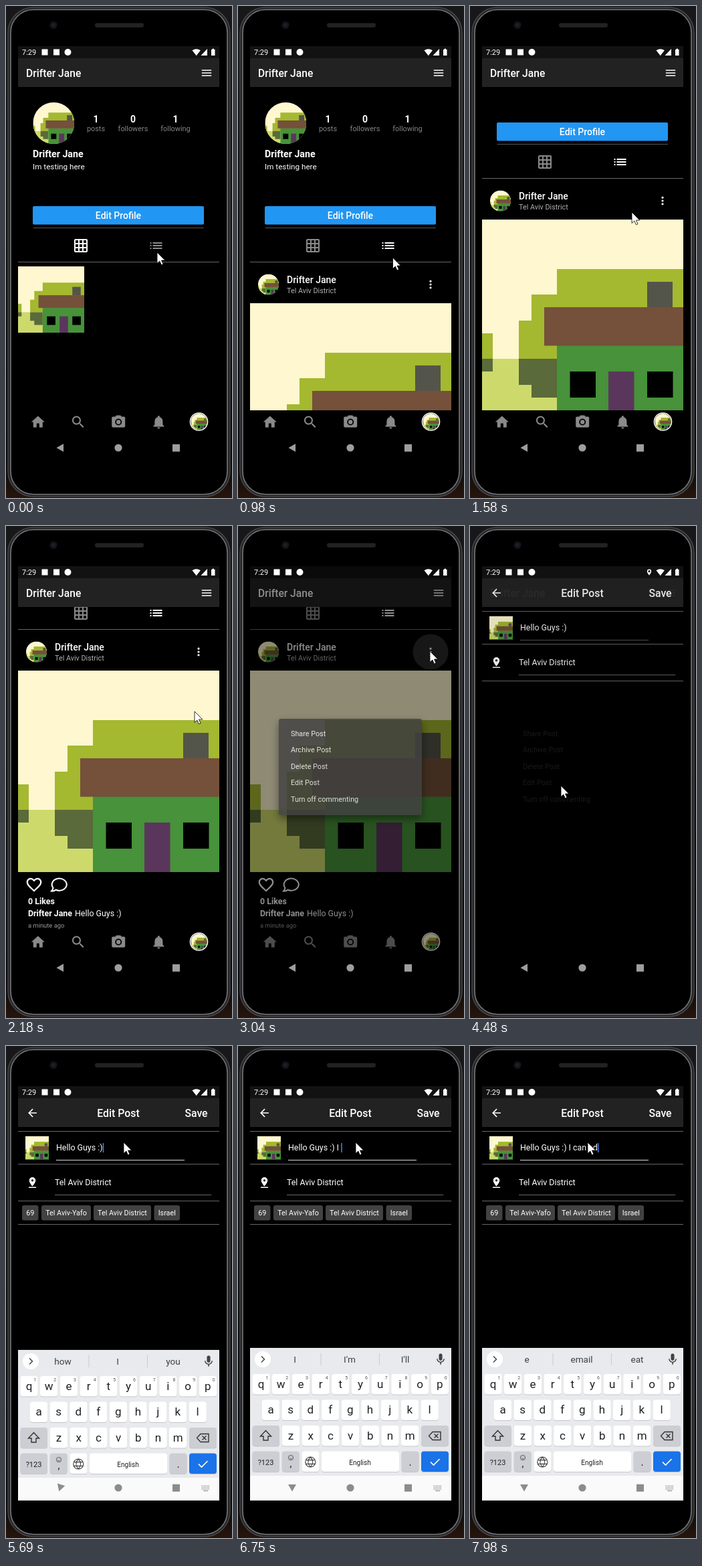
These frames come from a looping animation (338 by 735 pixels, 8 s). An HTML page:

```html
<!DOCTYPE html>
<html lang="en">
<head>
<meta charset="utf-8">
<title>Profile post editing</title>
<style>
  html, body { margin: 0; width: 100%; height: 100%; overflow: hidden; background: #070708; }
  svg { display: block; width: 338px; height: 735px; }
  text { font-family: Roboto, Arial, sans-serif; white-space: pre; }
</style>
</head>
<body>
<svg id="stage" viewBox="0 0 338 735"></svg>
<script>
const LOOP = 8000;
const USER = 'Drifter Jane';
const GREY = '#8a8a8a', LINE = '#666';

// Icons on a 24-unit square
const ICONS = {
  grid: 'M20 2H4c-1.1 0-2 .9-2 2v16c0 1.1.9 2 2 2h16c1.1 0 2-.9 2-2V4c0-1.1-.9-2-2-2zM8 20H4v-4h4v4zm0-6H4v-4h4v4zm0-6H4V4h4v4zm6 12h-4v-4h4v4zm0-6h-4v-4h4v4zm0-6h-4V4h4v4zm6 12h-4v-4h4v4zm0-6h-4v-4h4v4zm0-6h-4V4h4v4z',
  list: 'M3 13h2v-2H3zm0 4h2v-2H3zm0-8h2V7H3zm4 4h14v-2H7zm0 4h14v-2H7zM7 7v2h14V7z',
  menu: 'M3 18h18v-2H3zm0-5h18v-2H3zm0-7v2h18V6z',
  home: 'M10 20v-6h4v6h5v-8h3L12 3 2 12h3v8z',
  search: 'M15.5 14h-.8l-.3-.3A6.5 6.5 0 1 0 13.7 14.4l.3.3v.8l5 5 1.5-1.5zm-6 0a4.5 4.5 0 1 1 0-9 4.5 4.5 0 0 1 0 9z',
  camera: 'M12 8.8a3.2 3.2 0 1 0 0 6.4 3.2 3.2 0 0 0 0-6.4zM9 2 7.2 4H4c-1.1 0-2 .9-2 2v12c0 1.1.9 2 2 2h16c1.1 0 2-.9 2-2V6c0-1.1-.9-2-2-2h-3.2L15 2zm3 15a5 5 0 1 1 0-10 5 5 0 0 1 0 10z',
  bell: 'M12 22c1.1 0 2-.9 2-2h-4c0 1.1.9 2 2 2zm6-6v-5c0-3.1-1.6-5.6-4.5-6.3V4a1.5 1.5 0 0 0-3 0v.7C7.6 5.4 6 7.9 6 11v5l-2 2v1h16v-1z',
  dots: 'M12 8a2 2 0 1 0 0-4 2 2 0 0 0 0 4zm0 2a2 2 0 1 0 0 4 2 2 0 0 0 0-4zm0 6a2 2 0 1 0 0 4 2 2 0 0 0 0-4z',
  heart: 'M16.5 3c-1.7 0-3.4.8-4.5 2.1C10.9 3.8 9.2 3 7.5 3 4.4 3 2 5.4 2 8.5c0 3.8 3.4 6.9 8.6 11.5l1.4 1.3 1.4-1.3C18.6 15.4 22 12.3 22 8.5 22 5.4 19.6 3 16.5 3zm-4.4 15.6-.1.1-.1-.1C7.1 14.2 4 11.4 4 8.5 4 6.5 5.5 5 7.5 5c1.5 0 3 1 3.6 2.4h1.9C13.5 6 15 5 16.5 5c2 0 3.5 1.5 3.5 3.5 0 2.9-3.1 5.7-7.9 10.1z',
  back: 'M20 11H7.8l5.6-5.6L12 4l-8 8 8 8 1.4-1.4L7.8 13H20z',
  pin: 'M18 8A6 6 0 0 0 6 8c0 4.5 6 11 6 11s6-6.5 6-11zm-8 0a2 2 0 1 1 4 0 2 2 0 0 1-4 0zM5 20v2h14v-2z',
  place: 'M12 2a7 7 0 0 0-7 7c0 5.3 7 13 7 13s7-7.7 7-13a7 7 0 0 0-7-7zm0 3.5a3.5 3.5 0 1 1 0 7 3.5 3.5 0 0 1 0-7z',
  mic: 'M12 14a3 3 0 0 0 3-3V5a3 3 0 0 0-6 0v6a3 3 0 0 0 3 3zm5.3-3a5.3 5.3 0 0 1-10.6 0H5c0 3.4 2.7 6.2 6 6.7V21h2v-3.3c3.3-.5 6-3.3 6-6.7z'
};

const rect = (x, y, w, h, fill, r = 0, more = '') =>
  `<rect x="${x}" y="${y}" width="${w}" height="${h}" rx="${r}" fill="${fill}" ${more}/>`;
const disc = (x, y, r, fill) => `<circle cx="${x}" cy="${y}" r="${r}" fill="${fill}"/>`;
const path = (d, fill, more = '') => `<path d="${d}" fill="${fill}" ${more}/>`;
const stroke = (d, color, w = 1.5) => path(d, 'none', `stroke="${color}" stroke-width="${w}"`);
const text = (x, y, size, str, fill = '#fff', weight = 400, more = '') =>
  `<text x="${x}" y="${y}" font-size="${size}" font-weight="${weight}" fill="${fill}" ${more}>${str}</text>`;
const mid = (x, y, size, str, fill, weight, more = '') =>
  text(x, y, size, str, fill, weight, `text-anchor="middle" ${more}`);
const icon = (name, x, y, scale = 1, fill = '#fff', more = '') =>
  path(ICONS[name], fill, `fill-rule="evenodd" transform="translate(${x} ${y}) scale(${scale}) translate(-12 -12)" ${more}`);
const group = (id, body, more = '') => `<g id="${id}" ${more}>${body}</g>`;
const rule = (y, x = 18, w = 301, color = LINE, more = '') => rect(x, y, w, 1, color, 0, more);
const house = (x, y, size) => `<use href="#house" x="${x}" y="${y}" width="${size}" height="${size}"/>`;
const avatar = (x, y, r) => `<svg x="${x - r}" y="${y - r}" width="${2 * r}" height="${2 * r}" viewBox="0 0 301 301">
  <g clip-path="url(#round)">${house(0, 0, 301)}</g></svg>`;

const defs = `<defs>
  <symbol id="house" viewBox="0 0 301 301">
    ${rect(0, 0, 301, 301, '#fef7d0')}${rect(0, 208, 112, 93, '#cdda6b')}
    ${rect(0, 170, 16, 38, '#a4b830')}${rect(0, 208, 16, 19, '#5a6a3a')}
    ${path('M112 74H301V208H55V151H74V112H112z', '#a4b830')}
    ${path('M55 208H112V266H74V247H55z', '#5a6a3a')}
    ${rect(112, 188, 189, 113, '#47923a')}${rect(93, 131, 208, 57.5, '#75503a')}
    ${rect(247, 93, 38, 38, '#54554a')}
    ${rect(131.5, 227, 38.5, 39, '#000')}${rect(247, 227, 38.5, 39, '#000')}
    ${rect(189, 227, 38.5, 74, '#5b365c')}
  </symbol>
  <clipPath id="round"><circle cx="150.5" cy="150.5" r="150.5"/></clipPath>
  <clipPath id="screen"><rect x="18" y="60" width="301" height="619"/></clipPath>
  <clipPath id="view"><rect x="18" y="121" width="301" height="483"/></clipPath>
  <linearGradient id="desk" x2="0" y2="1">
    <stop offset="0" stop-color="#18181a"/><stop offset=".93" stop-color="#0a0a0a"/><stop offset="1" stop-color="#27150d"/>
  </linearGradient>
  <filter id="shade" x="-20%" y="-20%" width="140%" height="150%">
    <feDropShadow dx="0" dy="5" stdDeviation="6" flood-opacity=".5"/>
  </filter>
</defs>`;

const phone = rect(0, 0, 338, 735, 'url(#desk)')
  + rect(3, 2, 332, 731, '#262628', 38, 'stroke="#454548" stroke-width="1.5"')
  + rect(7, 5.5, 324, 724, '#000', 34, 'stroke="#77777b" stroke-width="1.6"')
  + rect(133, 25.5, 73, 6.5, '#222224', 3.2) + disc(71, 28.5, 5.5, '#141519') + disc(71, 28.5, 2.5, '#1e202a');

const bars = rect(18, 60, 301, 18, '#121212') + rect(18, 78, 301, 43, '#222');

const stats = [['1', 'posts', 134.5], ['0', 'followers', 190], ['1', 'following', 253.5]]
  .map(([n, label, x]) => mid(x, 174, 14, n, '#fff', 700) + mid(x, 187, 10.9, label, '#858585')).join('');

// Post laid out at its final scrolled place
const post = avatar(45.5, 188, 15.5)
  + text(73, 185.5, 14, USER, '#fff', 500) + text(73, 200.5, 10.8, 'Tel Aviv District', '#b0b0b0')
  + group('splash', disc(288, 188, 26.5, '#2a2a2a'))
  + icon('dots', 288, 188, .8) + house(18, 216, 301)
  + icon('heart', 42, 536, 1.13)
  + stroke('M70.5 540.5A11 9 0 1 1 74.5 543.5Q72 546 68 545.5Q70 543.5 70.5 540.5z', '#fff', 2)
  + text(33, 565, 12.4, '0 Likes', '#fff', 700) + text(33, 583, 12.4, USER, '#fff', 700)
  + text(103, 583, 12.4, 'Hello Guys :)') + text(33, 600, 9.4, 'a minute ago', '#9a9a9a');

const profile = rect(18, 60, 301, 619, '#000')
  + `<g clip-path="url(#view)">` + group('scroll',
    avatar(71.3, 175, 31) + stats
    + text(40, 226, 14.2, USER, '#fff', 700) + text(40, 244, 11.7, 'Im testing here')
    + rect(40, 299, 256, 27.5, '#2196f3', 2) + mid(168, 318, 14, 'Edit Profile', '#fff', 500)
    + rule(331, 40.5, 255.5, '#555') + rule(382)
    + group('tabSplash', disc(224.5, 358, 26, '#fff'))
    + icon('grid', 112, 358, 1, '#fff', 'id="gridTab"') + icon('list', 224.5, 358, 1, GREY, 'id="listTab"')
    + group('thumbs', house(18, 389, 99)) + group('feed', post, 'transform="translate(0 228)"'))
  + '</g>' + bars + text(30, 105.5, 15.6, USER, '#fff', 500) + icon('menu', 300, 100, .8)
  + ['home', 'search', 'camera', 'bell'].map((n, i) => icon(n, 47.8 + 60.2 * i, 621.5, 1, GREY)).join('')
  + disc(288.5, 621, 13.8, '#fff') + disc(288.5, 621, 12.3, '#000') + avatar(288.5, 621, 12);

const scrim = rect(18, 60, 301, 582, '#000', 0, 'id="scrim"') + rect(18, 121, 301, 521, '#000', 0, 'id="cover"');
const dialog = rect(61, 288, 214, 144, '#424242', 3, 'id="box" filter="url(#shade)"')
  + rect(61, 371, 214, 24.5, '#fff', 0, 'id="press" opacity="0"')
  + ['Share Post', 'Archive Post', 'Delete Post', 'Edit Post', 'Turn off commenting']
    .map((s, i) => text(79, 313.5 + 24.6 * i, 10.8, s)).join('');

const chips = [[24, 24.5, '69'], [53, 74, 'Tel Aviv-Yafo'], [131, 86, 'Tel Aviv District'], [221.5, 38.5, 'Israel']]
  .map(([x, w, s]) => rect(x, 238, w, 22.5, '#424242', 3) + mid(x + w / 2, 253, 10.8, s, '#fff')).join('') + rule(266);

const edit = rect(18, 60, 301, 582, '#000') + bars
  + icon('back', 39.5, 100, .8) + mid(168, 105.5, 15.8, 'Edit Post', '#fff', 500) + mid(284.5, 105.5, 15.8, 'Save', '#fff', 500)
  + rule(127) + rule(176) + rule(231) + house(29, 134.5, 35)
  + text(75, 156, 12.4, 'Hello Guys :)', '#fff', 400, 'id="typed"')
  + rule(170, 75, 192, '#555', 'id="focusLine"') + rect(144, 145, 1.5, 14, '#4285f4', 0, 'id="caret"')
  + icon('pin', 39.5, 204, .8) + text(73, 208, 12.4, 'Tel Aviv District') + rule(222, 73, 234)
  + group('chips', chips);

const INK = '#202124', SOFT = '#ccced3';
const key = (x, y, w, fill = '#fff') => rect(x, y + 1, w, 30.5, '#c4c6ca', 4) + rect(x, y, w, 30.5, fill, 4);
const keyRow = (letters, x, y) => [...letters].map((c, i) => {
  const cx = x + 29.7 * i;
  return key(cx - 13.2, y, 26.4) + mid(cx, y + 20.5, 17, c, INK);
}).join('');

const keyboard = rect(18, 451, 301, 191, '#e8eaed') + rect(18, 642, 301, 60, '#fafafa')
  + disc(37, 468, 12, '#fff') + stroke('M35 463.5l4.5 4.5-4.5 4.5', '#444')
  + rect(123.5, 459, 1, 18, '#cacccf') + rect(211, 459, 1, 18, '#cacccf') + icon('mic', 303, 468, .85, '#444')
  + [85, 167, 250].map((x, i) => mid(x, 473, 13.6, '', '#3c4043', 400, `id="hint${i}"`)).join('')
  + keyRow('qwertyuiop', 34.5, 490)
  + [...'1234567890'].map((n, i) => mid(43.5 + 29.7 * i, 498, 7, n, '#555')).join('')
  + keyRow('asdfghjkl', 49, 528.5) + keyRow('zxcvbnm', 79, 567)
  + key(21.5, 567, 40.5, SOFT) + stroke('M41.5 574.5l8 8.5h-4.5v6h-7v-6h-4.5z', '#333', 1.4)
  + key(274, 567, 41, SOFT) + stroke('M291 576.5h12v12h-12l-5.5-6zM293.5 579.5l6 6m0-6l-6 6', '#333', 1.4)
  + key(21.5, 605.5, 40.5, SOFT) + mid(41.5, 625.5, 11, '?123', INK)
  + key(65.8, 605.5, 26, SOFT) + mid(79, 629, 15, ',', INK)
  + stroke('M75.3 615a3.7 3.7 0 1 0 7.4 0a3.7 3.7 0 1 0-7.4 0M77 616q2 2 4 0M77.5 613.7v.6m3-.6v.6', '#555', .9)
  + key(95.5, 605.5, 26)
  + stroke('M100.8 621.5a7.5 7.5 0 1 0 15 0a7.5 7.5 0 1 0-15 0M108.3 614q-7 7.5 0 15q7-7.5 0-15M102 618.7h12.6M102 624.3h12.6', '#444', 1.2)
  + key(125, 605.5, 116) + mid(182.5, 625.5, 10, 'English', INK)
  + key(244.5, 605.5, 26, SOFT) + mid(257.5, 627, 16, '.', INK)
  + key(274, 605.5, 41, '#1a73e8') + stroke('M288 621.5l4.5 4.5 9-9', '#fff', 1.7);

const keyDots = Array.from({ length: 15 }, (_, i) =>
  rect(292.5 + 2.5 * (i % 5), 656.5 + 2.4 * Math.floor(i / 5), 1.5, 1.4, '#999')).join('');

const system = text(24, 73, 11, '7:29')
  + rect(53.5, 64.5, 9, 9, '#fff') + rect(71, 64.5, 9, 9, '#fff') + disc(92.5, 69, 5, '#fff')
  + group('locating', icon('place', 268, 69, .45))
  + path('M278.5 66.3q6.2-4.3 12.4 0l-6.2 8z', '#fff') + path('M301 64v10h-9.5z', '#fff')
  + path('M307 65h1.5v-1.2h2.5v1.2h1.5v9h-5.5z', '#fff')
  + group('navKeys', '<path id="backKey" d="M75 655H87L81 665.5z"/><circle cx="168" cy="660" r="5.6"/>'
    + '<rect x="249" y="654.7" width="11" height="11"/>')
  + group('kbKey', keyDots + rect(295, 663.8, 7, 1.3, '#999'));

const stage = document.getElementById('stage');
stage.innerHTML = defs + phone + '<g clip-path="url(#screen)">'
  + profile + scrim + group('dialog', dialog) + group('edit', edit) + group('keyboard', keyboard) + system + '</g>'
  + path('M0 0V16.5L3.8 13L6.4 18.8L9 17.6L6.5 12H11.8z', '#fff', 'id="mouse" stroke="#000" stroke-width=".8"');

const el = {};
stage.querySelectorAll('[id]').forEach(e => el[e.id] = e);
const set = (id, name, value) => el[id].setAttribute(name, value);
const show = (id, amount) => set(id, 'opacity', +amount);
const move = (id, x, y) => set(id, 'transform', `translate(${x} ${y})`);

// Moments at which the picture refreshes: [start, count], 120 ms apart
const beats = [[0, 1], [120, 1], [370, 1], [620, 7], [1460, 7], [2430, 4], [3040, 7], [3880, 7], [4720, 7], [5560, 1], [5690, 2]]
  .flatMap(([start, n]) => Array.from({ length: n }, (_, i) => start + 120 * i));
const last = (list, t, time = k => k[0]) => list.filter(k => time(k) <= t).pop() || list[0];

// Linear value between [time, value] keys
function tween(keys, t, col = 1) {
  const i = keys.findIndex(k => k[0] > t);
  if (i === 0) return keys[0][col];
  if (i < 0) return keys[keys.length - 1][col];
  const a = keys[i - 1], b = keys[i];
  return a[col] + (b[col] - a[col]) * (t - a[0]) / (b[0] - a[0]);
}

const mousePath = [[0, 226, 368], [120, 236, 366], [370, 230, 358], [860, 230, 358], [1340, 236, 430], [1580, 242, 308],
  [1820, 258, 272], [2180, 282, 277], [2430, 283, 262], [2790, 287, 187], [3160, 287, 187], [3760, 136, 388],
  [4720, 136, 388], [5320, 176, 144]];
const scrollKeys = [[1340, 0], [1460, 55], [1580, 125], [1700, 185], [1820, 215], [1940, 228]];
const dialogFade = [[2920, 0], [3040, .82], [3160, 1]];
const coverFade = [[4240, 0], [4360, .6], [4480, 1]];
const pageFade = [[4120, 0], [4240, .04], [4360, .4], [4480, .9], [4600, 1]];
const pageRise = [[4120, 144], [4240, 110], [4360, 30], [4480, 0]];
const kbDrop = [[5440, 230], [5560, 70], [5690, 3], [5810, 0]];
const backTurn = [[5320, 90], [5440, 78], [5560, 50], [5690, 18], [5810, 0]];

const typing = [[0, ''], [5810, ' '], [6510, ' I'], [6750, ' I '], [6870, ' I c'], [7110, ' I ca'], [7360, ' I can'],
  [7480, ' I can '], [7730, ' I can e'], [7980, ' I can ed']];
const hints = [[0, 'how I you'], [6750, "I I'm I'll"], [6870, 'was have am'], [7110, 'c can could'], [7360, 'ca can call'],
  [7480, "can can't candy"], [7730, 'you be do'], [7980, 'e email eat']];

let lastTyped = null;
function type(str) {
  if (str === lastTyped) return;
  lastTyped = str;
  el.typed.textContent = 'Hello Guys :)' + str;
  set('caret', 'x', 75.2 + el.typed.getComputedTextLength());
}

function draw(now) {
  const t = now % LOOP;
  const q = last(beats, t, b => b);
  const listOn = q >= 620, feedOn = q >= 740, kbOn = q >= 5560;

  move('mouse', tween(mousePath, q, 1), tween(mousePath, q, 2));
  move('scroll', 0, -tween(scrollKeys, q));
  set('gridTab', 'fill', listOn ? GREY : '#fff');
  set('listTab', 'fill', listOn ? '#fff' : GREY);
  show('tabSplash', listOn ? tween([[620, .14], [980, 0]], q) : 0);
  show('thumbs', !feedOn);
  show('feed', feedOn);
  show('splash', q >= 3040 ? tween([[3040, 1], [3400, 0]], q) : 0);

  const open = tween(dialogFade, q), covered = tween(coverFade, q);
  show('scrim', .54 * open);
  show('cover', covered);
  show('dialog', open);
  show('box', 1 - covered);
  show('press', q >= 3880 ? .08 * (1 - covered) : 0);
  show('edit', tween(pageFade, q));
  move('edit', 0, tween(pageRise, q));
  show('locating', q >= 4360 && q < 4960);
  show('chips', q >= 5080);
  set('focusLine', 'fill', q >= 5440 ? '#d8d8d8' : '#555');
  show('caret', q >= 5440 && !(t >= 6270 && t < 6510));

  show('keyboard', kbOn);
  show('kbKey', kbOn);
  move('keyboard', 0, tween(kbDrop, q));
  set('backKey', 'transform', `rotate(${tween(backTurn, q)} 81 660)`);
  set('navKeys', 'fill', kbOn ? '#8c8c8c' : '#9e9e9e');
  type(last(typing, t)[1]);
  last(hints, t)[1].split(' ').forEach((word, i) => el['hint' + i].textContent = word);
}

function loop() {
  draw(performance.now());
  requestAnimationFrame(loop);
}
loop();
</script>
</body>
</html>
```
